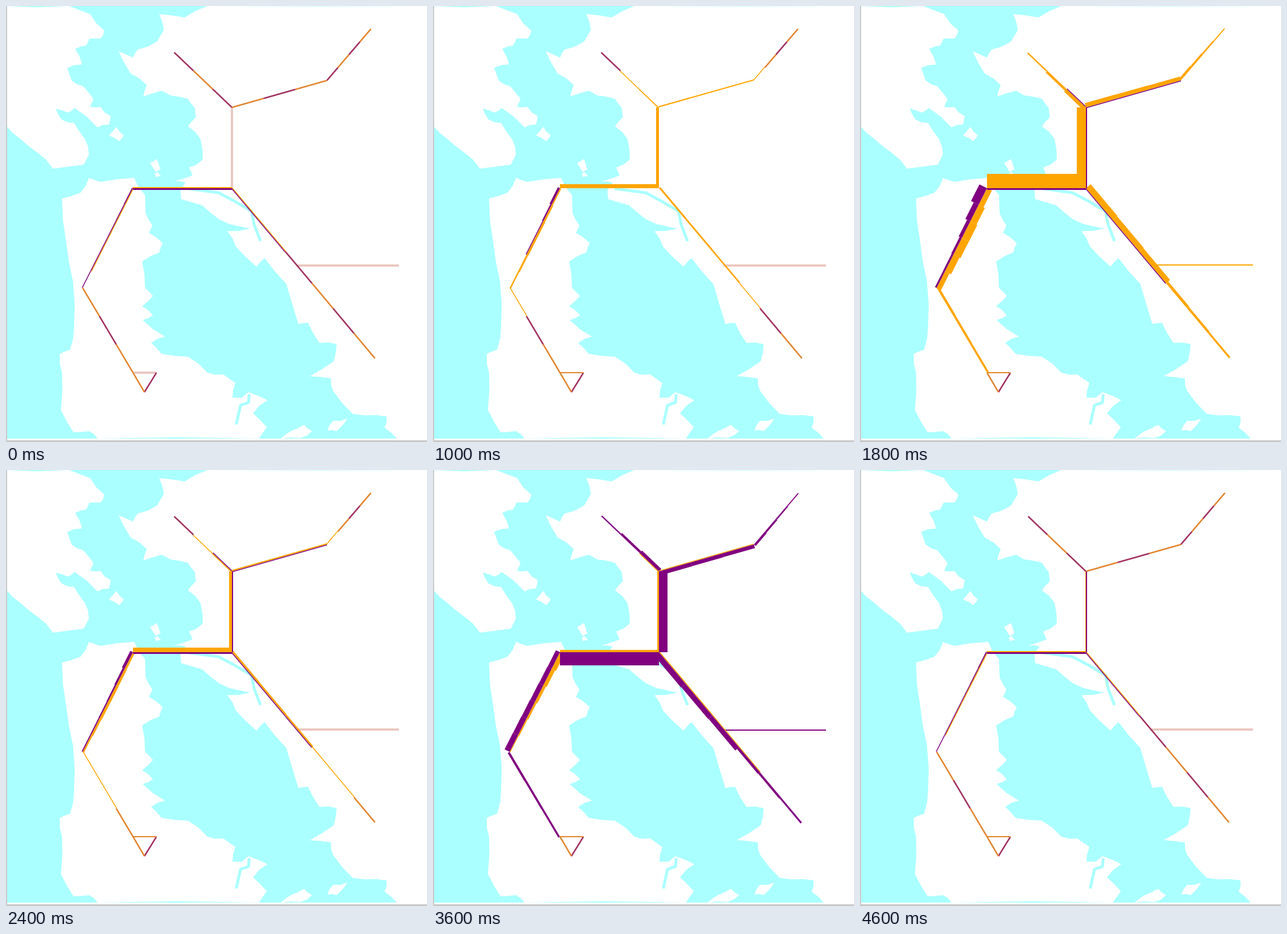
Recreate the animation shown at these times as a matplotlib script. Size 736x761 px, loop 4800 ms.

```python
import numpy as np
import matplotlib.pyplot as plt
from matplotlib.animation import FuncAnimation
from matplotlib.collections import PolyCollection
from matplotlib.patches import Polygon, Rectangle

W, H = 736, 761
WATER, LAND, FRAME = "#aaffff", "#ffffff", "#c9c9c9"
ORANGE, PURPLE, TRACK = "#ffa500", "#800080", "#ebc8c2"
THIN = ("#e2852f", "#a0305f")
SHOULDER = .77      # evening trips relative to morning trips

# Key points of the shores; roughen() adds the small coves
NORTH_WEST = [
    (0, 0), (110, 0), (147, 14), (172, 43), (165, 57), (146, 57), (140, 69),
    (121, 75), (133, 102), (107, 108), (115, 130), (135, 140), (153, 162),
    (147, 176), (165, 176), (183, 192), (180, 207), (160, 212), (120, 178),
    (108, 186), (87, 179), (97, 198), (119, 204), (138, 232), (145, 259),
    (136, 277), (120, 279), (82, 284), (55, 256), (25, 232), (0, 209)]
PENINSULA = [
    (98, 336), (130, 326), (145, 300), (165, 307), (224, 300), (243, 330),
    (244, 362), (256, 383), (250, 396), (274, 414), (268, 430), (238, 446),
    (243, 492), (257, 506), (238, 524), (257, 540), (239, 548), (278, 577),
    (254, 588), (272, 607), (318, 612), (352, 640), (380, 643), (401, 658),
    (396, 684), (412, 684), (424, 674), (457, 688), (432, 711), (456, 735),
    (442, 755)]
OCEAN_BEACH = [
    (160, 755), (145, 742), (118, 744), (96, 705), (98, 640), (94, 607),
    (112, 600), (119, 560), (117, 480), (105, 410)]
EAST_BAY = [
    (352, 0), (312, 20), (268, 14), (276, 42), (264, 62), (230, 76),
    (222, 90), (197, 79), (218, 118), (246, 138), (240, 158), (273, 148),
    (287, 156), (318, 162), (330, 178), (332, 194), (318, 210), (340, 232),
    (344, 268), (320, 282), (326, 296), (293, 307), (314, 308), (305, 322),
    (306, 337), (343, 348), (372, 372), (410, 385), (428, 388), (387, 393),
    (402, 420), (438, 455), (452, 440), (490, 485), (511, 555), (528, 553),
    (548, 588), (578, 590), (573, 620), (531, 646), (568, 650), (572, 672),
    (606, 712), (648, 714), (665, 716), (662, 736), (683, 755), (W, 755),
    (W, 0)]
ISLANDS = [
    [(180, 226), (193, 211), (206, 226), (198, 236)],
    [(252, 274), (264, 267), (270, 285), (262, 290)],
    [(260, 293), (266, 290), (271, 297), (262, 299)],
    [(480, 755), (498, 742), (521, 731), (535, 742), (515, 754)],
    [(562, 741), (572, 724), (597, 720), (578, 742)]]
CHANNELS = [
    [(320, 319), (372, 326), (400, 341), (429, 358), (434, 382), (444, 408)],
    [(425, 680), (424, 692), (410, 697), (403, 728)]]

HUB, FORK, CITY, WEST = (395, 318), (395, 177), (222, 318), (134, 492)
BRANCH, BEND = (508, 453), (222, 640)


def roughen(points, rng, amount=.1):
    """Push the middle of every edge sideways by a small random step."""
    shore = []
    for a, b in zip(np.array(points, float), np.roll(points, -2)):
        normal = np.array([a[1] - b[1], b[0] - a[0]])
        step = rng.uniform(-amount, amount) * min(1, 25 / np.hypot(*normal))
        shore += [a, (a + b) / 2 + step * normal]
    return shore


def bump(x, centre, width, power=2):
    return np.exp(-abs((x - centre) / width) ** power)


def demand(k):
    """Inbound and outbound strength, k hours after the first train."""
    inbound = .08 + .22 * bump(k, 9.5, 4.5, 4) + 1.25 * bump(k, 3.7, 2)
    outbound = .16 * np.clip((k - 1) / 3, 0, 1) + 1.15 * bump(k, 13.3, 2.2)
    return inbound, outbound


def commute(outer, inner):
    """Morning trips inbound, evening trips back, growing towards the city."""
    def widths(s, am, pm):
        load = outer + (inner - outer) * s
        return load * am, SHOULDER * load * pm
    return widths


def city_flow(s, am, pm):
    """Both directions mix on the stretch through the city centre."""
    return ((7 + 7 * np.sin(np.pi * s)) * am + 7 * s ** 2 * pm,
            (2 + 16 * s ** 3) * am + (8 - 4 * s ** 2) * pm)


def always(k, am, pm):
    return k < 23


def daytime(k, am, pm):
    return 1 <= k < 20


def rush(k, am, pm):
    return max(am, pm) > .75


# (outer end, inner end, links, first tone, widths, service hours)
LEGS = [
    ((294, 81), FORK, 3, 1, commute(1.5, 7.5), always),
    ((638, 40), (561, 130), 4, 0, commute(1.5, 5), always),
    ((561, 130), FORK, 3, 0, commute(7, 8), always),
    ((687, 453), BRANCH, 1, 0, commute(2.5, 2.5), rush),
    ((645, 615), (535, 484), 3, 0, commute(3, 5.5), always),
    ((535, 484), HUB, 3, 1, commute(9, 11.5), always),
    ((242, 674), (263, 640), 1, 1, commute(1, 1), always),
    ((263, 640), BEND, 1, 0, commute(1, 1), daytime),
    ((242, 674), BEND, 1, 0, commute(1.2, 1.2), always),
    (BEND, WEST, 3, 0, commute(3.5, 4.5), always),
    (WEST, CITY, 6, 1, city_flow, always),
    (FORK, HUB, 2, 0, commute(16, 16), daytime),
    (HUB, CITY, 1, 0, commute(25, 25), always),
]


def band(a, b, lo, hi):
    """Strip along a-b, from lo to hi px to the right of travel."""
    dx, dy = (b - a) / np.hypot(*(b - a))
    n = np.array([-dy, dx])
    return [a + lo * n, b + lo * n, b + hi * n, a + hi * n]


def link_bands(a, b, orange, purple, tone):
    if max(orange, purple) < 1.2:
        return [(band(a, b, -1.3, 1.3), THIN[tone])]
    bands = []
    if orange > .8:
        bands.append((band(a, b, 0, max(orange, 1.5)), ORANGE))
    if purple > .8:
        bands.append((band(a, b, -max(purple, 1.5), 0), PURPLE))
    return bands


def network(hour):
    """Faint tracks first, then the passenger flows."""
    k = (hour - 4) % 24
    am, pm = demand(k)
    tracks, flows = [], []
    for start, end, n, tone, widths, runs in LEGS:
        if not runs(k, am, pm):
            ends = np.array([start, end], float)
            tracks.append((band(*ends, -2, 2), TRACK))
            continue
        stops = np.linspace(start, end, n + 1)
        for i in range(n):
            orange, purple = widths((i + .5) / n, am, pm)
            flows += link_bands(stops[i], stops[i + 1], orange, purple,
                                (tone + i) % 2)
    return tracks + flows


fig = plt.figure(figsize=(W / 100, H / 100), dpi=100, facecolor=LAND)
ax = fig.add_axes([0, 0, 1, 1])
ax.set_xlim(0, W)
ax.set_ylim(H, 0)
ax.axis("off")

rng = np.random.default_rng(4)
ax.add_patch(Rectangle((0, 0), W, 755, color=WATER, lw=0))
for shore in [NORTH_WEST, PENINSULA + OCEAN_BEACH, EAST_BAY] + ISLANDS:
    ax.add_patch(Polygon(roughen(shore, rng), facecolor=LAND, edgecolor="none"))
for channel in CHANNELS:
    ax.plot(*zip(*channel), color=WATER, lw=3.6)
ax.add_patch(Rectangle((0, 0), 2, H, color=FRAME, lw=0))
ax.add_patch(Rectangle((0, 758), W, 3, color=FRAME, lw=0))

flows = PolyCollection([], edgecolors="none", zorder=5)
ax.add_collection(flows, autolim=False)


def update(hour):
    shapes, colors = zip(*network(hour))
    flows.set_verts(shapes)
    flows.set_facecolor(colors)
    return [flows]


anim = FuncAnimation(fig, update, frames=24, interval=200, repeat=True,
                     repeat_delay=0)
plt.show()
```
